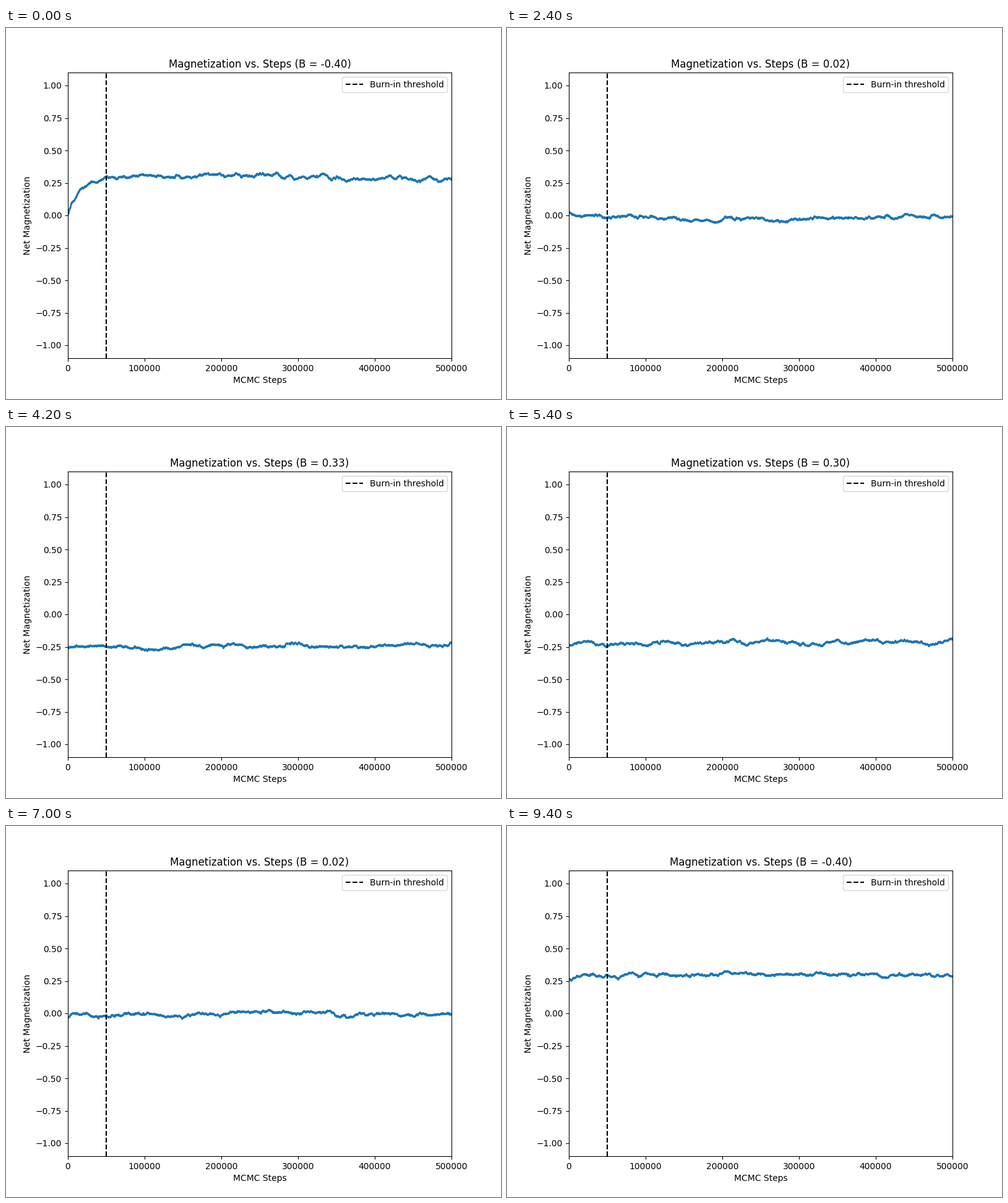
A matplotlib script for the animation above (9600 ms loop, 800x600 px).

```python
import matplotlib.pyplot as plt
import numpy as np
from matplotlib.animation import FuncAnimation

FRAMES, INTERVAL = 48, 200
STEPS, SAMPLES = 500_000, 10_001
TAU = 16_000          # relaxation time of the chain, in steps
SPREAD = 0.013        # equilibrium spread of the magnetization
SLOPE = -0.735        # equilibrium magnetization per unit of field

rng = np.random.default_rng(7)
steps = np.linspace(0, STEPS, SAMPLES)
sweep = np.linspace(-0.4, 0.4, FRAMES // 2)
fields = np.concatenate([sweep, sweep[::-1]])


def fluctuations():
    """Mean-reverting random walks from zero, one row per field value."""
    decay = np.exp(-steps[1] / TAU)
    kick = SPREAD * np.sqrt(1 - decay**2)
    walks = np.zeros((SAMPLES, FRAMES))
    for k in range(1, SAMPLES):
        walks[k] = walks[k - 1] * decay + rng.normal(0, kick, FRAMES)
    return walks.T


def simulate():
    """Each run relaxes from where the previous one stopped."""
    runs, start = [], 0.0
    for field, noise in zip(fields, fluctuations()):
        level = SLOPE * field
        run = level + (start - level) * np.exp(-steps / TAU) + noise
        runs.append(run)
        start = run[-1]
    return runs


runs = simulate()

fig, ax = plt.subplots(figsize=(8, 6), dpi=100)
trace, = ax.plot(steps, runs[0], color="tab:blue", lw=2)
ax.axvline(50_000, color="black", ls="--", lw=1.5, label="Burn-in threshold")
ax.set_xlim(0, STEPS)
ax.set_ylim(-1.1, 1.1)
ax.set_xlabel("MCMC Steps")
ax.set_ylabel("Net Magnetization")
ax.legend(loc="upper right")
title = ax.set_title("")


def update(i):
    trace.set_ydata(runs[i])
    title.set_text(f"Magnetization vs. Steps (B = {fields[i]:.2f})")
    return trace, title


anim = FuncAnimation(fig, update, frames=FRAMES, interval=INTERVAL,
                     repeat=True, repeat_delay=0)
plt.show()
```
